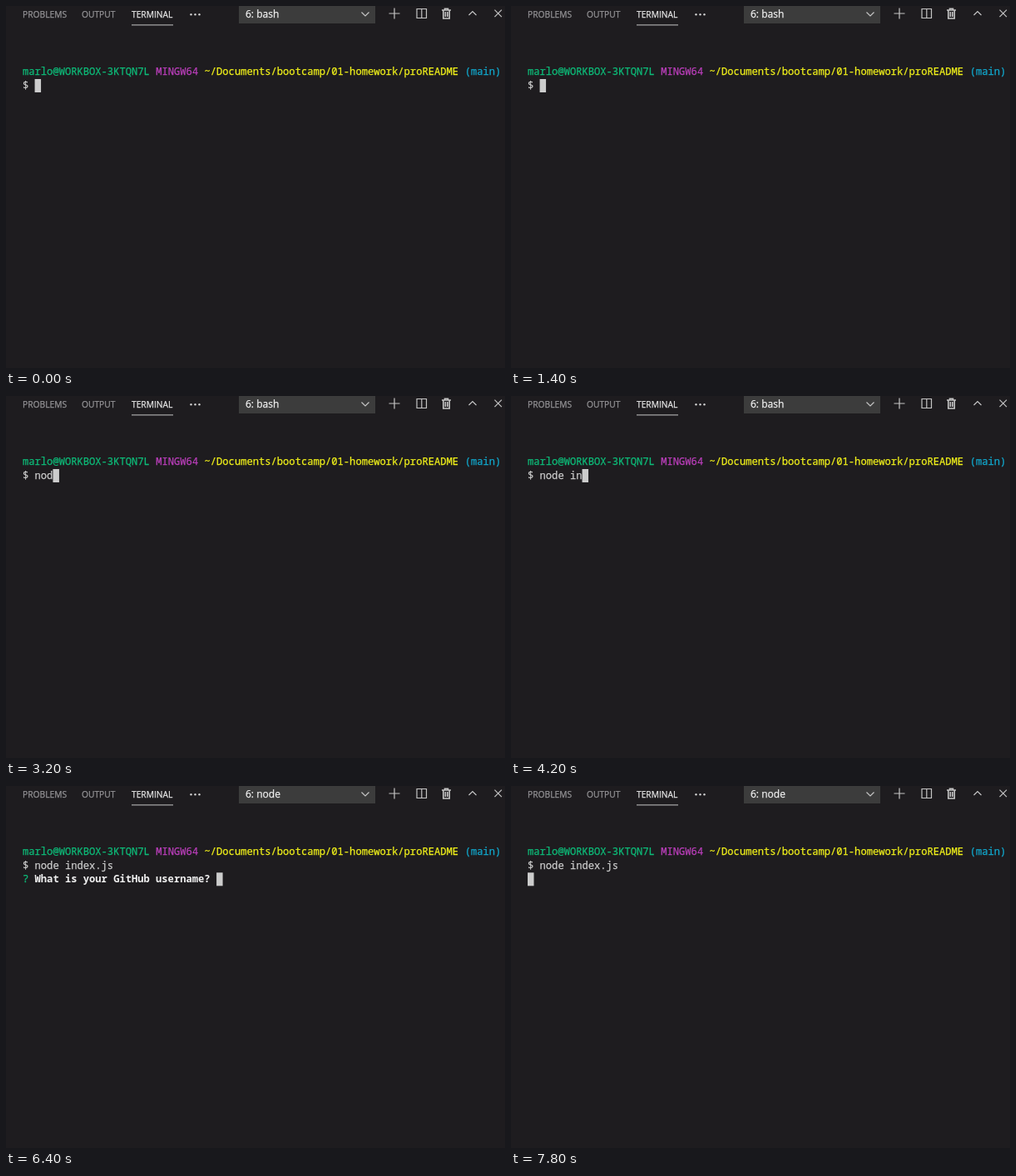
Animation, 600 px wide and 436 px high, one loop 8000 ms. Source, as an HTML page:

```html
<!DOCTYPE html>
<html lang="en">
<head>
<meta charset="utf-8">
<title>Terminal session</title>
<style>
  html, body { margin: 0; width: 100%; height: 100%; overflow: hidden; background: #1e1c1f; }
  svg { display: block; width: 600px; height: 436px; }
  /* A hairline stroke gives the slightly heavier text weight */
  text { white-space: pre; fill: currentColor; stroke: currentColor; stroke-width: .25px; }
  .ui { font: 10.25px "Open Sans", "Noto Sans", sans-serif; color: #949396; }
  .ui .on { color: #e7e7e7; }
  .ui .pick { font-size: 12px; color: #f0f0f0; }
  .term { font: 12.14px "Noto Sans Mono", "DejaVu Sans Mono", monospace; color: #ccc; }
  .term .ask { color: #f0f0f0; font-weight: bold; stroke: none; }
  .icons { fill: none; stroke: #c5c5c5; stroke-width: 1.2; }
</style>
</head>
<body>
<svg viewBox="0 0 600 436">
  <rect width="600" height="436" fill="#1e1c1f"/>
  <g class="ui">
    <text x="20" y="13.8">PROBLEMS</text>
    <text x="91" y="13.8">OUTPUT</text>
    <text x="151" y="13.8" class="on">TERMINAL</text>
    <path d="M151 22.9H201" stroke="#c8c8c8"/>
    <g fill="#d0d0d0">
      <circle cx="222.5" cy="10.3" r="1.2"/>
      <circle cx="227.5" cy="10.3" r="1.2"/>
      <circle cx="232.5" cy="10.3" r="1.2"/>
    </g>
    <rect x="280" width="164" height="21" fill="#3c3c3c"/>
    <text id="shell" x="288" y="14.2" class="pick"></text>
  </g>
  <g class="icons">
    <path d="M427.5 7.5L432 12L436.5 7.5"/>
    <path d="M460.5 9H473.5M467 2.5V15.5"/>
    <path d="M494 3.5H505.5V14.5H494ZM499.8 3.5V14.5"/>
    <path stroke-width="1.6" d="M524 5H535M527.5 5V3.3H531.5V5M525.8 5.5V15H533.2V5.5M528.3 7V13M530.8 7V13"/>
    <path d="M556.5 11L561 6.5L565.5 11"/>
    <path d="M587.5 4.7L596 13.2M596 4.7L587.5 13.2"/>
  </g>
  <g class="term">
    <g id="prompt"></g>
    <text id="command" x="20" y="99.8"></text>
    <g id="question">
      <text x="20" y="116" color="#0dbc79">?</text>
      <text id="ask" y="116" class="ask">What is your GitHub username?</text>
    </g>
    <rect id="cursor" width="7.5" height="16" fill="#ccc"/>
  </g>
</svg>
<script>
const LOOP = 8000, LEFT = 20, CELL = 7.284;
const COMMAND = "node index.js";
// Time at which each character of the command appears
const KEYS = [2800, 3000, 3200, 3400, 3600, 4000, 4200, 4400, 4600, 5200, 5400, 5600, 5800];
const ENTER = 6000, RENAME = 6200, ASK = 6400, CLEAR = 7800;

const $ = id => document.getElementById(id);
const column = n => LEFT + n * CELL;

const runs = [
  ["marlo@WORKBOX-3KTQN7L", "#0dbc79"],
  ["MINGW64", "#bc3fbc"],
  ["~/Documents/bootcamp/01-homework/proREADME", "#f0f01a"],
  ["(main)", "#11a8cd"]
];
let col = 0;
for (const [content, color] of runs) {
  const run = document.createElementNS("http://www.w3.org/2000/svg", "text");
  run.textContent = content;
  run.setAttribute("x", column(col));
  run.setAttribute("y", 83.4);
  run.setAttribute("color", color);
  $("prompt").append(run);
  col += content.length + 1;
}
$("ask").setAttribute("x", column(2));

function draw(now) {
  const t = now % LOOP;
  const typed = KEYS.filter(k => k <= t).length;
  const asking = t >= ASK && t < CLEAR;
  const entered = t >= ENTER;

  $("shell").textContent = t < RENAME ? "6: bash" : "6: node";
  $("command").textContent = "$ " + COMMAND.slice(0, typed);
  $("question").setAttribute("visibility", asking ? "visible" : "hidden");
  $("cursor").setAttribute("x", column(asking ? 32 : entered ? 0 : 2 + typed));
  $("cursor").setAttribute("y", entered ? 104.3 : 88);
}

const start = performance.now();
function tick() {
  draw(performance.now() - start);
  requestAnimationFrame(tick);
}
tick();
</script>
</body>
</html>
```
